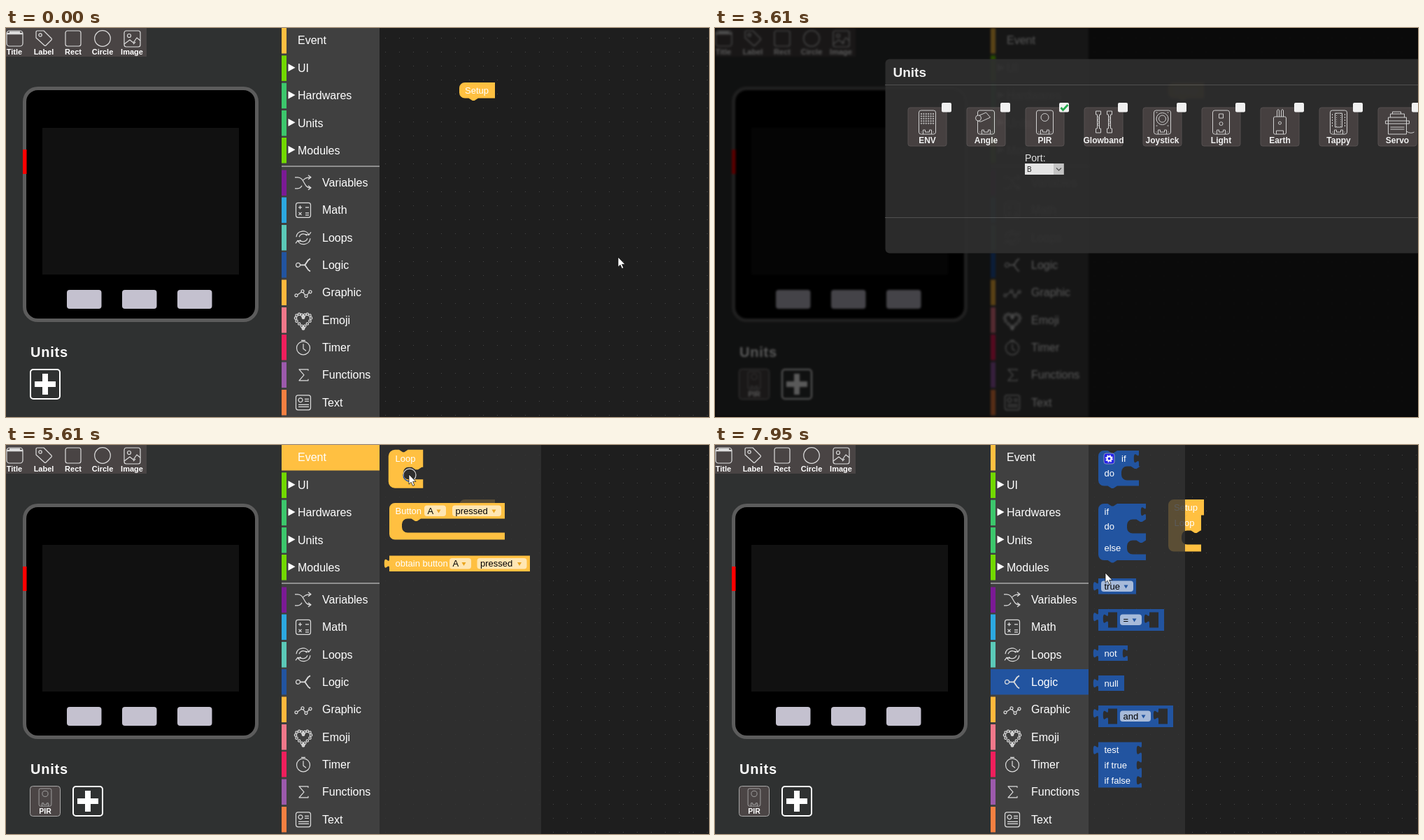
Animation, 1005 px wide and 557 px high, one loop 8 s. Source, as an HTML page:

```html
<!DOCTYPE html>
<html lang="en">
<head>
<meta charset="utf-8">
<title>Block editor</title>
<style>
  html, body { margin: 0; height: 100%; overflow: hidden; background: #000; }
  svg { display: block; width: 100vw; height: 100vh; font-family: "Liberation Sans", Arial, sans-serif; }
  .line { fill: none; stroke: #ddd; stroke-width: 1.2; stroke-linejoin: round; }
  .ring { mix-blend-mode: difference; }
</style>
</head>
<body>
<svg id="stage" viewBox="0 0 1005 557"></svg>
<script>
const YELLOW = '#ffc041', BLUE = '#2254a0';

// --- markup helpers ---
const rect = (x, y, w, h, fill, more = '') =>
  `<rect x="${x}" y="${y}" width="${w}" height="${h}" fill="${fill}" ${more}/>`;
const text = (x, y, s, size = 16, more = 'fill="#fff"') =>
  `<text x="${x}" y="${y}" font-size="${size}" ${more}>${s}</text>`;
const path = (d, more = '') => `<path d="${d}" ${more}/>`;
const circle = (x, y, r, more = '') => `<circle cx="${x}" cy="${y}" r="${r}" ${more}/>`;
const group = (x, y, body, more = '') => `<g transform="translate(${x} ${y})" ${more}>${body}</g>`;
const layer = (id, body) => `<g id="${id}">${body}</g>`;
const label = (x, y, s, size) => text(x, y, s, size, 'fill="#fff" font-weight="bold" text-anchor="middle"');

// --- left side: toolbar, device, units ---
const tools = {
  Title: '<rect x="-11" y="4" width="23" height="22" rx="4"/><path d="M-11 8H12M-7 6H8" stroke-width="2.5"/>',
  Label: '<path d="M-11 6q0-2 2-2l9 0 11 11q1 1 0 2l-8 8q-1 1-2 0l-12-11z"/><circle cx="-5" cy="10" r="2.2"/>',
  Rect: '<rect x="-11" y="4" width="22" height="22" rx="3"/>',
  Circle: '<circle cy="15" r="11.3"/>',
  Image: '<rect x="-11" y="4" width="23" height="23" rx="3"/><circle cx="-4" cy="11" r="2.5"/><path d="M-11 23l8-6 5 4 5-7 5 4M2 23l3-3"/>'
};
const toolbar = rect(0, 0, 201, 41, '#494444') + Object.keys(tools).map((name, i) =>
  group(12 + 42 * i, 0, `<g class="line">${tools[name]}</g>` + label(0, 38, name, 11))).join('');

const device = rect(26.5, 86.5, 332, 332, '#000', 'rx="19" stroke="#5c5c5c" stroke-width="5"') +
  rect(52, 143, 281, 210, '#111') + rect(24, 174, 5.5, 35, '#f00') +
  [87, 166, 245].map(x => rect(x, 375, 49.5, 27, '#c4c1cf', 'rx="4"')).join('');

const body = '<rect x="-12" y="4" width="24" height="34" rx="3"/><path d="M-6 38v-6h3v3h6v-3h3v6M-9 35h1M8 35h1"/>';
const dots = (cols, rows, step) => Array.from({ length: cols * rows }, (_, i) =>
  circle((i % cols - (cols - 1) / 2) * step, 9 + Math.floor(i / cols) * step, 0.7)).join('');
const strip = x => `<path d="M${x - 3} 5h7v5h-2v20h2v6h-7v-6h2v-20h-2zM${x - 1} 12l3 3-3 3 3 3-3 3 3 3"/>`;
const units = {
  ENV: body + dots(6, 5, 3.4),
  Angle: body + '<path d="M-14 13l14-6 6 7-13 6q-6 1-7-7z" fill="#4b4545"/><circle cx="-11" cy="15" r="4" fill="#4b4545"/>',
  PIR: body + '<circle cy="14" r="5.5"/>',
  Glowband: strip(-8) + strip(8),
  Joystick: body + '<circle cy="16" r="8.5"/><circle cy="16" r="5"/><path d="M-9 7h2M7 7h2M-9 26h2M7 26h2"/>',
  Light: body + '<rect x="-3" y="9" width="6" height="6"/><circle cy="23" r="2.5"/>',
  Earth: '<rect x="-9" y="13" width="18" height="25" rx="2"/><path d="M-4 13v-9q2-3 3 0v9M2 13v-9q2-3 3 0v9M-5 38v-5h10v5"/><circle cy="22" r="2"/>',
  Tappy: body + '<path d="M-5 8h10v20h-10z"/><path d="M-9 9v20M9 9v20" stroke-dasharray="2 2"/><path d="M-3 8v20M3 8v20" stroke-dasharray="1 2"/>',
  Servo: '<rect x="-13" y="14" width="26" height="24"/><path d="M-17 19h34v4h-34zM-10 14v-5h20v5M-7 9v-3h12v3M-10 28h20M-10 31h20M13 34q6 4 11 1"/>'
};
const names = Object.keys(units);
const tile = (name, i) => group(303.5 + 84 * i, 114,
  rect(-27.5, 0, 55, 55, '#4b4545', 'rx="3" stroke="#5b5555"') +
  `<g class="line" style="stroke-width:1">${units[name]}</g>` + label(0, 51, name, 12)) +
  checkbox(i);
const checkbox = i => rect(324 + 84 * i, 107, 14, 13.5, '#fff', 'rx="2"');

const plus = rect(-21, -21, 42, 42, 'none', 'id="plusBox" rx="4" stroke="#fff" stroke-width="2"') +
  path('M-15 0H15M0-15V15', 'stroke="#fff" stroke-width="8"');
const pirTile = group(56, 510, rect(-21.5, -21.5, 43, 43, '#4b4545', 'rx="4" stroke="#aaa"') +
  `<g class="line" style="stroke:#aaa" transform="translate(0 -21) scale(.74)">${units.PIR}</g>` + label(0, 18, 'PIR', 10.5));

// --- category list ---
const heart = Array.from({ length: 20 }, (_, i) => {
  const a = i * Math.PI / 10, c = k => Math.cos(k * a);
  return circle(11 * Math.sin(a) ** 3, -0.72 * (13 * c(1) - 5 * c(2) - 2 * c(3) - c(4)), 1.7);
}).join('');
const box = '<rect x="-10.5" y="-10.5" width="21" height="21" rx="3"/>';
const cats = [
  ['Event', YELLOW, 0], ['UI', '#72d900', 39.4], ['Hardwares', '#3cc76c', 78.7], ['Units', '#3cc76c', 118], ['Modules', '#72d900', 157],
  ['Variables', '#7b1a95', 203.5, '<path d="M-12-8h4c10 0 8 15 18 15M-12 8h4q4 0 6-4M0-4q3-4 10-4M7-11l4 3-4 3M7 4l4 3-4 3"/>'],
  ['Math', '#2ca8e0', 242.5, box + '<path d="M-7-4h5M-4.5-6.500v5M3-4h5M-6.500 3l4 4m0-4l-4 4M3 4h5M3 7h5"/>'],
  ['Loops', '#5bc9b8', 282, '<path d="M-10-1C-9-11 5-12 8-4l3-4M8-4l-5-1M10 1C9 11-5 12-8 4l-3 4M-8 4l5 1M-6-1C-4-6 2-7 5-3M6 1C4 6-2 7-5 3"/>'],
  ['Logic', BLUE, 321, '<circle cx="-7.500" r="3"/><path d="M-4 0H2C5-2 5-7 10-9M2 0C5 2 5 7 10 9" stroke-width="1.800"/>'],
  ['Graphic', '#ffb83c', 360.5, '<path d="M-8 3l6-4M0 0l3 4M5 4l4-5"/><circle cx="-10" cy="4" r="2"/><circle cx="-1" cy="-2" r="2"/><circle cx="4" cy="5" r="2"/><circle cx="10" cy="-1" r="2"/>'],
  ['Emoji', '#f0788a', 400, heart],
  ['Timer', '#f01f5c', 439, '<circle cy="1" r="9.500"/><path d="M0-5V2l4 3M-3-10h6"/>'],
  ['Functions', '#9c5aac', 478.5, '<path d="M7-6v-2H-6L1 0-6 8H7v-2"/>'],
  ['Text', '#f58041', 518, box + '<circle cx="-4" cy="-3.500" r="3"/><path d="M2-5h6M2-2h6M-7 3H8M-7 6H8"/>']
];
const category = ([name, color, y, icon]) => {
  const cy = y < 1 ? 17 : y + 17.8;
  return rect(394, y, 7, 36.5, color) + rect(401, y, 133, 36.5, color, `id="row${name}" visibility="hidden"`) +
    (icon ? group(425, cy + 0.5, icon, 'class="line"') : y ? path(`M403.500 ${cy - 6}l10 5.500-10 5.500z`, 'fill="#fff"') : '') +
    text(icon ? 452 : 417, cy + 5.7, name);
};
const menu = rect(394, 0, 140, 557, '#404040') + cats.map(category).join('') + rect(394, 197.5, 140, 1, '#ddd');

// --- blocks ---
const back = 'l-5.4,3.6h-2.7l-5.4,-3.6', notch = 'H13.5l5.4,3.6h2.7l5.4,-3.6';
const socket = y => `V${y}v4.5c0,9 -7.2,-7.2 -7.2,6.75s7.2,-2.25 7.2,6.75`;
const hole = (x, y, w) => `V${y}H${x + 27}${back}h-5.5a8,8 0 0 0 -8,8v4a8,8 0 0 0 8,8H${w}`;
const stack = (w, h, fill, inner, top, bump) => path('M0,8a8,8 0 0 1 8,-8' + (top ? notch : '') +
  `H${w}${inner}V${h}` + (bump ? 'H27' + back : '') + 'H8a8,8 0 0 1 -8,-8Z', `fill="${fill}"`);
const value = (w, h, fill, inner = '') => path(`M0,0H${w}${inner}V${h}H0V18c0,-9 -7.2,7.2 -7.2,-6.75s7.2,2.25 7.2,-6.75Z`, `fill="${fill}"`);
const word = (x, y, s) => text(x, y, s, 13);
const field = (x, y, w, s, color) => rect(x, y, w, 15.5, '#fff', 'rx="4" fill-opacity=".6"') +
  text(x + 4.5, y + 12.3, s, 13, 'fill="#000"') + path(`M${x + w - 13.5} ${y + 6}h6l-3 5z`, `fill="${color}"`);
const gap = x => path(`M${x} 4.500h13v22h-13v-6c0,-9 -7.2,7.2 -7.2,-6.750s7.2,2.250 7.2,-6.750z`, 'fill="#2d2d2d"');

const setup = group(648, 78, stack(51, 22.5, YELLOW, '', false, true) + word(8, 15.5, 'Setup'));
const loopBlock = `<g id="outline" stroke="${YELLOW}">` + stack(47, 52.5, YELLOW, hole(19, 22.5, 47), true) + '</g>' +
  rect(0, -9, 9, 18, YELLOW, 'id="joint"') + word(8.5, 15.5, 'Loop');
const flyout = w => rect(534, 0, w, 557, '#333', 'fill-opacity=".8"');

const events = flyout(231) +
  group(548, 83, stack(165, 52.5, YELLOW, hole(18, 22.5, 165)) + word(8.5, 15.8, 'Button') +
    field(50, 3.5, 31, 'A', '#eaa520') + field(90, 3.5, 70, 'pressed', '#eaa520')) +
  group(548, 158.500, value(201, 22.5, YELLOW) + word(8.500, 15.5, 'obtain button') +
    field(86, 3.5, 31, 'A', '#eaa520') + field(125.5, 3.5, 71, 'pressed', '#eaa520'));

const gear = rect(8, 4, 15, 15, '#2424e8', 'rx="3" stroke="#aab" stroke-width=".8"') +
  circle(15.5, 11.5, 3, 'fill="none" stroke="#fff" stroke-width="2"') +
  circle(15.5, 11.5, 4.6, 'fill="none" stroke="#fff" stroke-width="1.6" stroke-dasharray="1.8 1.81"');
const logic = flyout(138) +
  group(548, 8, stack(58, 50.5, BLUE, socket(0) + hole(33, 22.5, 58), true, true) + gear + word(33, 15.5, 'if') + word(8.5, 37, 'do')) +
  group(548, 84, stack(68, 81, BLUE, socket(0) + hole(41, 22.5, 68) + hole(41, 52.5, 68), true, true) +
    word(8.5, 15.5, 'if') + word(8.5, 37, 'do') + word(8.5, 67.500, 'else')) +
  group(548, 191, value(54, 22.5, BLUE) + field(4, 3.5, 46, 'true', BLUE)) +
  group(548, 235, value(94, 31, BLUE) + gap(14) + field(31, 7.5, 31, '=', BLUE) + gap(73)) +
  group(548, 287, value(42, 22, BLUE, socket(0)) + word(8.5, 15.5, 'not')) +
  group(548, 330, value(37, 22, BLUE) + word(8.5, 15.5, 'null')) +
  group(548, 373, value(107, 31, BLUE) + gap(14) + field(31, 7.5, 44, 'and', BLUE) + gap(86)) +
  group(548, 425.5, value(62, 65, BLUE, socket(0) + socket(21.7) + socket(43.4)) +
    word(8.5, 15.5, 'test') + word(8.5, 37, 'if true') + word(8.5, 59, 'if false'));

// --- dialog ---
const port = path('M494.500 114l3 3.500 7-7.500', 'fill="none" stroke="#27b352" stroke-width="2.800"') +
  text(443, 191, 'Port:', 14, 'fill="#eee"') + rect(443, 194, 55.5, 16, '#f2f2f2') + rect(484, 194, 14.5, 16, '#cfcfcf') +
  text(446, 206, 'B', 10, 'fill="#222"') + path('M488 200.500l3.500 3.500 3.500-3.500', 'fill="none" stroke="#555" stroke-width="1.2"');
const dialog = rect(243.5, 44.5, 800, 278, '#2e2e2e', 'rx="6"') + rect(243, 81, 762, 1, '#565656') + rect(243, 271, 762, 1, '#565656') +
  text(254.5, 70, 'Units', 19, 'fill="#fff" font-weight="bold"') + names.map(tile).join('') + layer('port', port);

stage.innerHTML = `<defs><pattern id="grid" x="542" y="14" width="20" height="20" patternUnits="userSpaceOnUse">${rect(0, 0, 1, 1, '#484848')}</pattern></defs>` +
  layer('page', rect(0, 0, 394, 557, '#2f3131') + toolbar + device +
    text(35, 471, 'Units', 20, 'fill="#fff" font-weight="bold" letter-spacing=".8"') +
    layer('pirTile', pirTile) + layer('plus', plus) +
    rect(534, 0, 471, 557, '#1e1e1e') + rect(534, 0, 471, 557, 'url(#grid)') + setup +
    layer('events', events) + layer('loopBlock', loopBlock) + layer('logic', logic) + menu) +
  rect(0, 0, 1005, 557, '#000', 'id="shade"') + layer('dialog', dialog) +
  circle(1, 1, 9, 'id="ring" class="ring" fill="none" stroke="#fff" stroke-width="1.3"') +
  layer('pointer', path('M0,0V14.2l3.2,-3 2.4,5.3 2.3,-1 -2.3,-5.1h4.400Z', 'fill="#fff" stroke="#000" stroke-width=".7"'));

// --- timing ---
// Runs of picture changes: start time and number of 120 ms steps.
const runs = [[0, 1], [250, 8], [1240, 9], [2350, 1], [2600, 4], [3610, 3], [4100, 1], [4250, 9], [5360, 1], [5610, 7], [6480, 9], [7590, 4]];
const snap = t => {
  const [start, n] = runs.findLast(r => r[0] <= t);
  return start + 120 * Math.min(n - 1, Math.floor((t - start) / 120));
};
const moves = [
  [0, 875, 328], [130, 875, 328], [850, 66, 538], [970, 62, 528], [1090, 59, 522], [1600, 59, 522],
  [1960, 557, 95], [2200, 497, 117], [2350, 499, 120], [2600, 499, 120], [2840, 937, 180], [2960, 1100, 200],
  [3850, 1100, 200], [4100, 973, 290], [4970, 478, 19], [5090, 478, 19], [5210, 524, 30], [5360, 576, 42],
  [5610, 576, 42], [6330, 676, 134], [6840, 628, 131], [7200, 597, 142], [7320, 505, 290], [7440, 472, 330],
  [7590, 472, 330], [7950, 558, 183]
];
const fades = [[0, 0], [1120, 0], [1450, 1], [3550, 1], [3610, 0.94], [3850, 0], [8000, 0]];
const at = (keys, t) => {
  const i = keys.findLastIndex(k => k[0] <= t), a = keys[i], b = keys[i + 1] || a;
  const p = a === b ? 0 : (t - a[0]) / (b[0] - a[0]), e = p * p * (3 - 2 * p);
  return a.slice(1).map((v, k) => v + (b[k + 1] - v) * e);
};

const el = id => document.getElementById(id);
const show = (id, on) => el(id).setAttribute('visibility', on ? 'visible' : 'hidden');
const place = (id, x, y) => el(id).setAttribute('transform', `translate(${x} ${y})`);

function draw(t) {
  const within = (a, b) => t >= a && t < b;
  const [x, y] = at(moves, t), [fade] = at(fades, t), dim = Math.min(1, fade / 0.94);
  place('pointer', x, y);
  place('ring', x, y);
  show('ring', within(1090, 1240) || within(2350, 2600) || within(4970, 5090) || within(5360, 6330));

  el('page').style.filter = dim ? `blur(${1.5 * dim}px)` : 'none';
  el('shade').setAttribute('opacity', 0.65 * dim);
  el('dialog').setAttribute('opacity', fade);
  show('port', t >= 2600);
  show('pirTile', t >= 3610);
  place('plus', t >= 3610 ? 117 : 56, 510);
  el('plusBox').setAttribute('fill', within(970, 1240) ? '#444' : 'none');

  const [bx, by] = at(moves, Math.min(6330, Math.max(5610, t)));
  place('loopBlock', bx - 28, by - 34);
  show('loopBlock', t >= 5090);
  show('events', within(5090, 5730));
  show('logic', t >= 7590);
  el('joint').setAttribute('opacity', t >= 6330 ? 1 : 0);
  el('outline').setAttribute('stroke-width', within(5360, 7590) ? 2.5 : 0);

  const hoverEvent = within(4970, 5090);
  el('rowEvent').setAttribute('fill', hoverEvent ? '#e2e2e2' : YELLOW);
  show('rowEvent', hoverEvent || within(5090, 5730));
  el('rowLoops').setAttribute('fill', '#e2e2e2');
  show('rowLoops', within(7320, 7440));
  show('rowLogic', t >= 7590);
}

let last = -1;
function tick() {
  const t = snap(performance.now() % 8000);
  if (t !== last) draw(last = t);
  requestAnimationFrame(tick);
}
tick();
</script>
</body>
</html>
```
